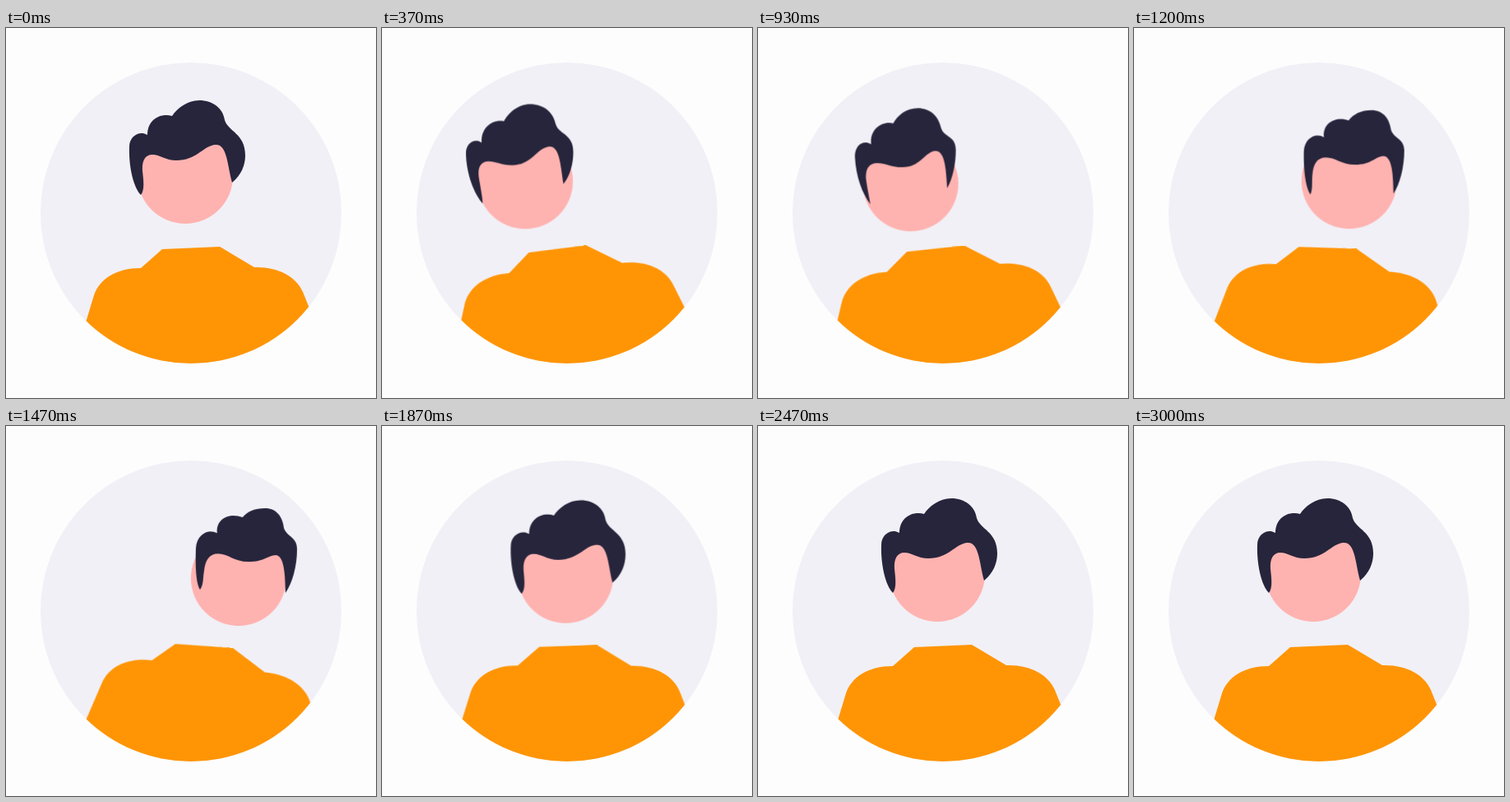
These frames come from a looping animation (450 px wide and 450 px high, 3030 ms). An HTML page:

```html
<!DOCTYPE html>
<html lang="en">
<head>
<meta charset="utf-8">
<title>Swaying avatar</title>
<style>
  html, body { margin: 0; width: 100%; height: 100%; overflow: hidden; background: #fdfdfd; }
  svg { display: block; width: 100%; height: 100%; }

  .shirt, .head, .nod, .hair {
    animation: 3030ms cubic-bezier(.33, 0, .67, 1) infinite;
  }
  .shirt { fill: #ff9505; transform-origin: 233px 408px; animation-name: lean; }
  .head { animation-name: sway; }
  .nod { animation-name: nod; }
  .hair { fill: #26253c; animation-name: turn; }

  /* rest, left, right, rest */
  @keyframes lean {
    0%, 65%, 100% { transform: rotate(0deg); }
    22.1% { transform: rotate(-8.2deg); }
    45.9% { transform: rotate(6.85deg); }
  }
  @keyframes sway {
    0%, 65%, 100% { transform: translateX(218px); }
    22.1% { transform: translateX(142.5px); }
    45.9% { transform: translateX(286.5px); }
  }
  /* The drop settles a little after the sway. */
  @keyframes nod {
    0%, 72%, 100% { transform: translateY(180px); }
    22.1% { transform: translateY(191px); }
    45.9% { transform: translateY(185.2px); }
  }
  @keyframes turn {
    0%, 65%, 100% {
      d: path("M-54 23 C-49 17 -51 4 -52 -6 C-53 -18 -49 -26 -40 -26 C-31 -26 -24 -19 -11 -19 C14 -19 21 -36 36 -38 C51 -40 51 -14 57 8 C68 -1 73 -13 73 -25 C73 -52 52 -54 48 -68 C46 -82 34 -92 17 -92 C2 -92 -10 -82 -16 -73 C-30 -77 -46 -69 -46 -50 C-56 -56 -68 -48 -68 -36 C-69 -12 -63 14 -54 23 Z");
    }
    22.1% {
      d: path("M-50 30 C-54 20 -58 4 -60 -7 C-61 -17 -57 -23 -48 -23 C-39 -23 -33 -20 -20 -20 C3 -20 8 -42 22 -45 C36 -48 37 -22 39 0 C45 -11 48 -28 48 -43 C48 -63 33 -58 29 -71 C25 -86 14 -95 -2 -95 C-17 -95 -28 -84 -33 -73 C-46 -75 -60 -63 -58 -45 C-68 -51 -76 -43 -75 -31 C-73 -6 -62 15 -50 30 Z");
    }
    45.9% {
      d: path("M-46.5 13.5 C-42 8 -43 -2 -41.5 -8 C-40 -22 -35 -30 -24 -30 C-12 -30 -4 -20 13 -20 C32 -20 36 -27 45.5 -27.5 C56 -27 57 -3 57 18.5 C65 7 71 -14 71 -36 C71 -50 59 -50 55.5 -60.5 C54 -74 47 -84.5 33 -84.5 C21 -84.5 12 -81 6 -74 C-8 -80 -27 -74 -25 -55 C-35 -61 -50 -54 -51 -37 C-52 -14 -51 6 -46.5 13.5 Z");
    }
  }
</style>
</head>
<body>
<svg viewBox="0 0 450 450">
  <clipPath id="disc"><circle cx="225" cy="225" r="183"/></clipPath>
  <circle cx="225" cy="225" r="183" fill="#f1f0f6"/>
  <g clip-path="url(#disc)">
    <path class="shirt" d="M60 480 L107 325 C114 305 134 292 164 292 L190 269 L260 266 L302 291 C330 290 353 302 361 321 L425 480 Z"/>
  </g>
  <g class="head">
    <g class="nod">
      <circle r="58" fill="#ffb3b0"/>
      <path class="hair" d="M0 0"/>
    </g>
  </g>
</svg>
</body>
</html>
```
